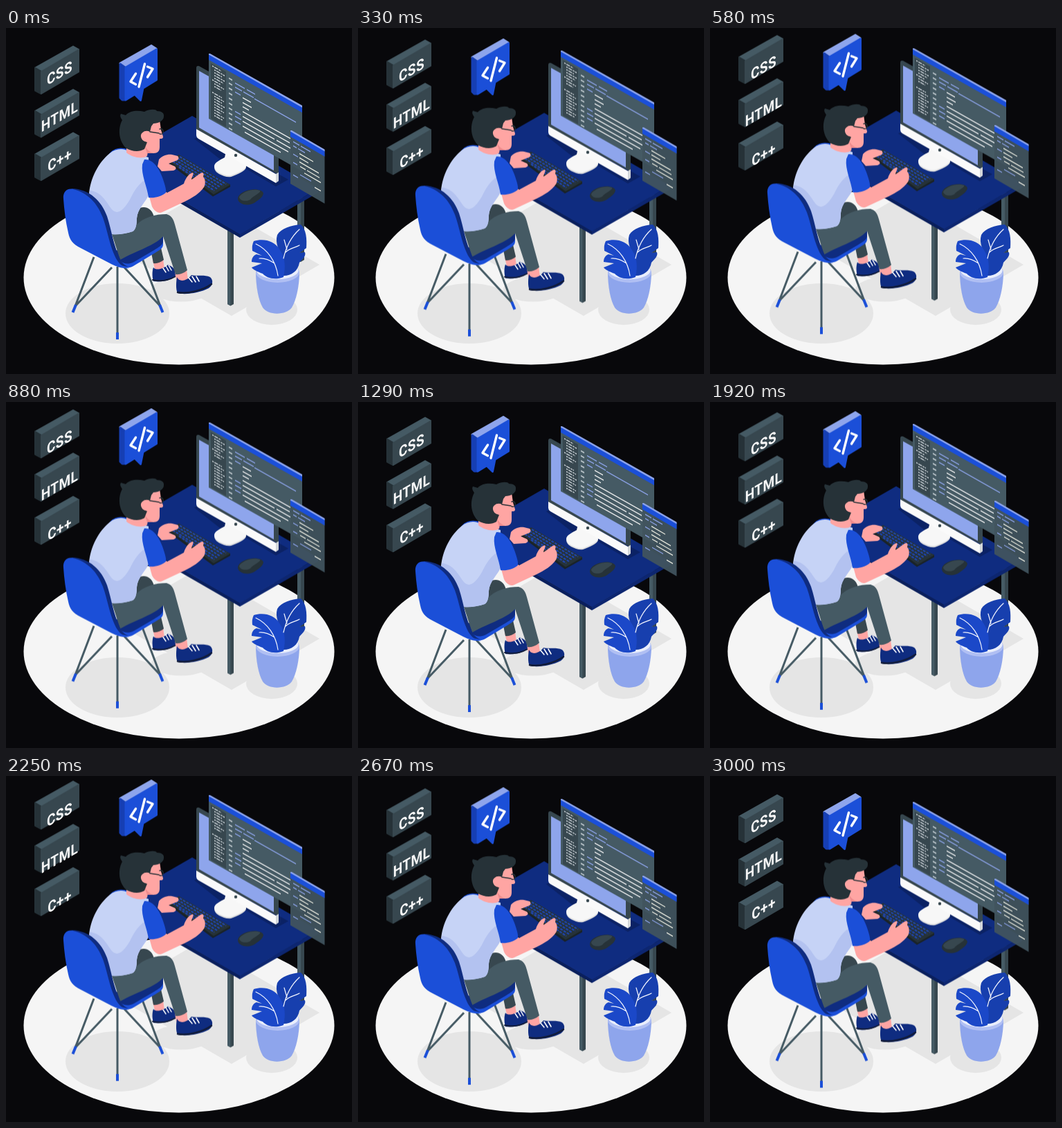
Animation, 500 px wide and 500 px high, one loop 3040 ms. Source, as an HTML page without scripts:

```html
<!DOCTYPE html>
<html lang="en">
<head>
<meta charset="utf-8">
<title>Developer at a desk</title>
<style>
  html, body { margin: 0; width: 100%; height: 100%; overflow: hidden; background: #08080b; }
  svg { display: block; width: 100vw; height: 100vh; }
  .float { animation: float 760ms linear -40ms infinite alternate; }
  @keyframes float {
    from { transform: translateY(.5px); }
    to { transform: translateY(-9.5px); }
  }
  .label { font: 700 22px Roboto, Arial, sans-serif; letter-spacing: .5px; fill: #f5f5f5; text-anchor: middle; }
  .line { fill: none; stroke-linecap: round; stroke-linejoin: round; }
  .blue { fill: #1b4fd8; }
  .navy { fill: #0f2c80; }
  .pale { fill: #8ea5ec; }
  .slate { fill: #455a64; }
  .steel { fill: #37474f; }
  .ink { fill: #263238; }
  .skin { fill: #ffa5a3; }
  .shade { fill: #e5e5e5; }
</style>
</head>
<body>
<svg viewBox="0 0 500 500">
  <defs>
    <g id="card" stroke-width="2" stroke-linejoin="round">
      <path d="M42 57.500 97 26.500 105 31 50.500 62.500Z" fill="#455a64" stroke="#455a64"/>
      <path d="M42 57.500 50.500 62.500V95L42 90.500Z" fill="#263238" stroke="#263238"/>
      <path d="M51 63 105 31.500V63.500L51 95Z" fill="#37474f" stroke="#37474f"/>
    </g>
  </defs>

  <!-- floor and fixed shadows -->
  <ellipse cx="250" cy="360.500" rx="224.500" ry="126" fill="#f5f5f5"/>
  <g class="shade">
    <ellipse cx="161" cy="412.500" rx="75" ry="43.500"/>
    <ellipse cx="384" cy="407" rx="37" ry="22"/>
    <path d="M326 416 453 342 278 241 151 315Z"/>
    <ellipse cx="253" cy="378" rx="43" ry="17.500"/>
  </g>

  <!-- desk -->
  <g class="float">
    <path class="steel" d="M421 245h10v90l-5 3-5-3ZM320 285h9v114l-4.500 2.500-4.500-2.500Z"/>
    <path class="slate" d="M421 245h5v93l-5-3ZM320 285h4.500v116.500l-4.500-2.500Z"/>
    <path d="M156 192 338 297v6L156 198Z" fill="#0a1f5c"/>
    <path d="M451 232 338 297v6L451 238Z" fill="#0d2670"/>
    <path class="navy" d="M269 127 451 232 338 298 156 192Z"/>
    <path d="M272 160 287 152 408 219 390 229 346 203 330 206Z" fill="#0b2265"/>

    <!-- keyboard -->
    <path d="M235 192V195.500L299 243.500 324 229.500V226Z" fill="#1a2327"/>
    <path class="ink" d="M235 192 250 183 324 226.500 300 240.500Z"/>
    <g fill="none" stroke="#1f45ab" stroke-width="2.200" stroke-dasharray="4 1.500">
      <path d="M251 186 318 225.500"/>
      <path d="M247.500 188.200 314 227.700"/>
      <path d="M244 190.400 309.500 230"/>
      <path d="M241 192.600 305 232.400"/>
      <path d="M250 201 301 235"/>
    </g>

    <!-- mouse -->
    <path class="ink" d="M335 247C335 240 345 235 352 234 361 232 371 234 372 239 371 245 365 248 360 252 352 258 336 256 335 247Z"/>
    <path class="steel" d="M337 244C341 237 357 231 367 235 369 238 358 242 353 248 346 252 337 249 337 244Z"/>

    <!-- monitor -->
    <path d="M301 200 316 188 345 192 347 200C348 205 340 209 328 214 322 217 314 214 308 211 303 208 301 205 301 200Z" fill="#dedede"/>
    <path d="M301 199C302 194 309 191 316 187L318 178 344 190 347 198C348 203 340 207 328 212 322 215 314 212 308 209 303 206 301 203 301 199Z" fill="#f7f7f7"/>
    <path class="steel" d="M275 58Q275 54 279 55L390 117Q394 119 394 124V212L275 147Z"/>
    <path class="pale" d="M279 62 387 122V206L279 144Z"/>
    <path d="M275 146 390 211V224L278 160Q275 158 275 155Z" fill="#fafafa"/>
    <path d="M390 211 394 208.500V221L390 224Z" fill="#d2d6da"/>
    <circle cx="332" cy="184" r="2.200" fill="#37474f"/>

    <!-- large window -->
    <g transform="matrix(1 .565 0 1 293 37)">
      <path class="slate" d="M0 0H135V94H0Z"/>
      <path class="steel" d="M3 12H25V92H3Z"/>
      <path class="blue" d="M0 0H135V9H0Z"/>
      <path class="pale" d="M0 0 2-1.200H135V1.600H0Z"/>
      <g fill="none" stroke-width="1.500">
        <g stroke="#d5dbe0" stroke-dasharray="2.200 1 5 1.200">
          <path d="M5 15h13M8 19h15M8 23h11M8 27h15M8 31h13M5 35h12M8 39h14M8 43h10"/>
          <path d="M5 53h14M8 57h14M8 61h11M8 65h15M8 69h12M8 73h14M8 77h10M8 81h14M8 85h12"/>
        </g>
        <path d="M31.500 18V92" stroke="#b4bfc5" stroke-width="5" stroke-dasharray="2.200 5"/>
        <g stroke="#8ea5ec">
          <path d="M38 21h14m3 0h12M38 27h10m2 0h15M66 28h60M38 34h8M38 62h8M38 69h9M38 76h8"/>
        </g>
        <g stroke="#f4f4f4">
          <path d="M49 36h12M49 43h13M49 49h9M49 56h70M49 63h68M49 70h46m3 0h21M49 77h66M52 84h52"/>
        </g>
      </g>
    </g>

    <!-- small window -->
    <g transform="matrix(1 .58 0 1 411 148)">
      <path d="M0 0H49.500V77H0Z" fill="#41545e" opacity=".95"/>
      <path class="blue" d="M0 0H49.500V9H0Z"/>
      <path class="pale" d="M0 0 2-1.200H49.500V1.500H0Z"/>
      <g fill="none" stroke-width="1.400">
        <path d="M4 14h9m2 0h14M4 20h5m2 0h10M4 32h7M4 44h6M14 56h16M4 62h7" stroke="#8ea5ec"/>
        <path d="M13 26h20M13 32h13M13 38h28M14 44h8m2 0h18M20 50h24M35 62h9" stroke="#f1f1e5"/>
      </g>
    </g>
  </g>

  <!-- person and chair -->
  <g class="float">
    <g class="line" stroke="#455a64" stroke-width="3" style="stroke-linecap:butt">
      <path d="M127 331 100 402 153 346M197 333 223 402 171 346M161 345V441"/>
      <path d="M101 400 96.500 411M222 400 226.500 411M161 440V450" stroke="#1b4fd8" stroke-width="4"/>
    </g>

    <!-- far leg -->
    <path class="skin" d="M212 336 227 333 229 349 216 352Z"/>
    <path class="navy" d="M213 346C217 351 228 348 234 342 241 345 246 350 246 355 245 362 230 368 213 366 211 360 211 351 213 346Z"/>
    <path class="line" d="M212 364C224 367 236 364 245 359" stroke="#111b38" stroke-width="2"/>
    <path class="line" d="M231 344 235 351M235 343 239 350M227 347 231 353" stroke="#fff" stroke-width="1.500"/>
    <path class="steel" d="M187 264C198 255 209 259 213 270L228 335Q221 341 213 340L206 305 186 286Z"/>

    <!-- seat -->
    <path class="blue" d="M155 325 227 302V313C227 318 222 321 217 324L184 344C177 348 170 347 162 344Z"/>
    <path class="navy" d="M158 322 227 301V309C226 314 220 317 214 321L185 338C177 342 170 341 166 337Z"/>

    <!-- near leg -->
    <path class="skin" d="M244 352 261 349 263 364 251 369 246 364Z"/>
    <path class="navy" d="M247 360C250 367 260 367 268 357 278 359 287 356 295 360 300 364 299 372 293 376 280 383 258 386 248 383 245 378 246 366 247 360Z"/>
    <path class="line" d="M248 382C262 385 285 379 297 370" stroke="#111b38" stroke-width="2.500"/>
    <path class="line" d="M264 361 269 367M269 359 274 367M275 359 279 366" stroke="#fff" stroke-width="1.600"/>
    <path class="slate" d="M153 298C168 298 181 295 187 286 199 273 216 269 232 269 239 271 242 276 244 284L262 350Q254 357 245 356L227 301C214 315 190 321 165 335Z"/>

    <!-- far hand -->
    <path class="skin" d="M221 190C226 184 234 182 240 183L248 185C251 188 249 191 245 192L235 196 244 200C247 203 245 205 242 206L225 207 219 200Z"/>

    <!-- torso -->
    <path class="blue" d="M148 184C153 174 166 171 177 176L176 184Z"/>
    <path d="M150 181C159 174 170 173 178 179 187 185 198 184 206 187L207 240C202 251 190 261 189 275 189 285 187 292 183 294 174 297 163 299 153 298 145 271 135 249 120 240 122 216 134 194 150 181Z" fill="#c6d3f6"/>
    <path d="M121 235C137 236 145 251 152 261 161 272 170 263 179 248 184 238 189 228 200 220L207 240C202 251 190 261 189 275 189 285 187 292 183 294 174 297 163 299 153 298 145 271 135 249 120 240Z" fill="#b3c2f0"/>

    <!-- near arm -->
    <path class="skin" d="M206 240 228 235 233 238 257 225C259 218 264 210 270 209 272 211 268 216 268 219 274 216 279 210 284 209 287 211 285 213 285 215 289 219 288 227 286 230 280 239 270 245 258 251L226 266C220 269 214 264 211 258Z"/>
    <path class="blue" d="M200 190C212 189 221 202 226 216 230 227 232 235 231 238 224 244 214 246 206 245 204 229 195 212 197 197Z"/>

    <!-- head -->
    <path class="skin" d="M174 170 208 160 204 185C197 190 182 187 174 180Z"/>
    <path class="skin" d="M201 137 222 133 224 147 227 157C227 160 225 160 222 160L222 172C222 178 219 181 213 181 203 181 198 174 196 166Z"/>
    <path d="M204 181C202 175 200 170 200 167 202 175 207 179 213 181Z" fill="#ef8c8d"/>
    <path class="ink" d="M168 133C166 130 164 127 166 124L173 126C180 119 190 119 200 121 207 117 217 117 218 120 225 120 229 123 228 128 228 134 220 138 213 138L210 142 208 150C202 147 195 150 196 157 196 162 200 164 204 165L200 175C192 180 181 178 174 174 163 164 161 146 168 133Z"/>
    <path class="skin" d="M207 151C201 147 194 151 195 157 196 163 202 166 207 163Z"/>
    <path class="line" d="M208 150 221 152M222 146C226 145 227 147 227 150 227 153 225 154 222 153" stroke="#263238" stroke-width="1.400"/>

    <!-- chair back -->
    <path class="navy" d="M95 232C121 233 138 250 146 272 153 294 155 313 165 334 168 341 174 345 181 346L160 342 110 270Z"/>
    <path class="blue" d="M83 247C82 237 88 231 97 233 118 238 132 253 140 274 147 294 149 311 157 329 162 340 168 346 178 347 169 348 160 345 152 341L108 318C96 312 92 306 90 296 86 279 84 262 83 247Z"/>
  </g>

  <!-- plant -->
  <path class="pale" d="M361 352C361 374 365 394 371 404 379 416 405 415 413 404 419 394 424 374 424 352Z"/>
  <ellipse cx="392.500" cy="353" rx="31.500" ry="15" fill="#b0bff3"/>
  <ellipse cx="392.500" cy="350.500" rx="30" ry="12.500" fill="#e9eefc"/>
  <path d="M426 284C412 285 397 290 392 299 388 312 396 322 398 333L399 358C411 359 422 352 424 339 428 334 434 330 432 324L424 325 434 318C435 305 434 291 426 284Z" fill="#173fae"/>
  <path d="M358 308C372 304 388 307 396 321 404 333 404 346 401 360 388 365 376 361 371 355 363 352 357 349 355 346L370 340 355 338C355 333 357 329 362 327L370 329 356 322Q355 314 358 308Z" fill="#1b48c8"/>
  <g class="line" stroke="#f4f6ff" stroke-width="1.200">
    <path d="M361 312C378 320 390 337 393 358M366 333C375 332 382 336 388 340"/>
    <path d="M424 291C414 300 405 315 401 333M406 320 402 306M404 324C410 318 417 318 424 314"/>
  </g>

  <!-- floating tags -->
  <g class="float">
    <g class="float">
      <use href="#card"/>
      <use href="#card" y="62.500"/>
      <use href="#card" y="125"/>

      <g stroke-width="3" stroke-linejoin="round">
        <path d="M165 51 210 25.500 217 30 172 56Z" fill="#8ea5ec" stroke="#8ea5ec"/>
        <path d="M165 52 172 57V104L168 104 165 101Z" fill="#163fb4" stroke="#163fb4"/>
        <path d="M173 57 217.500 31V75L198 87 194.500 104.500 186 96 173 104Z" fill="#1b4fd8" stroke="#1b4fd8"/>
      </g>
      <path class="line" d="M187.500 66 180 77.500 187.500 81.500M200.500 52 192 85M204.500 56 212 59 204.500 71" stroke="#fff" stroke-width="3.400"/>
    </g>
    <g class="label">
      <text transform="matrix(.866 -.5 0 1 77.500 72.500)">CSS</text>
      <text transform="matrix(.866 -.5 0 1 77.500 135.200)">HTML</text>
      <text transform="matrix(.866 -.5 0 1 77.500 198.200)">C++</text>
    </g>
  </g>
</svg>
</body>
</html>
```
